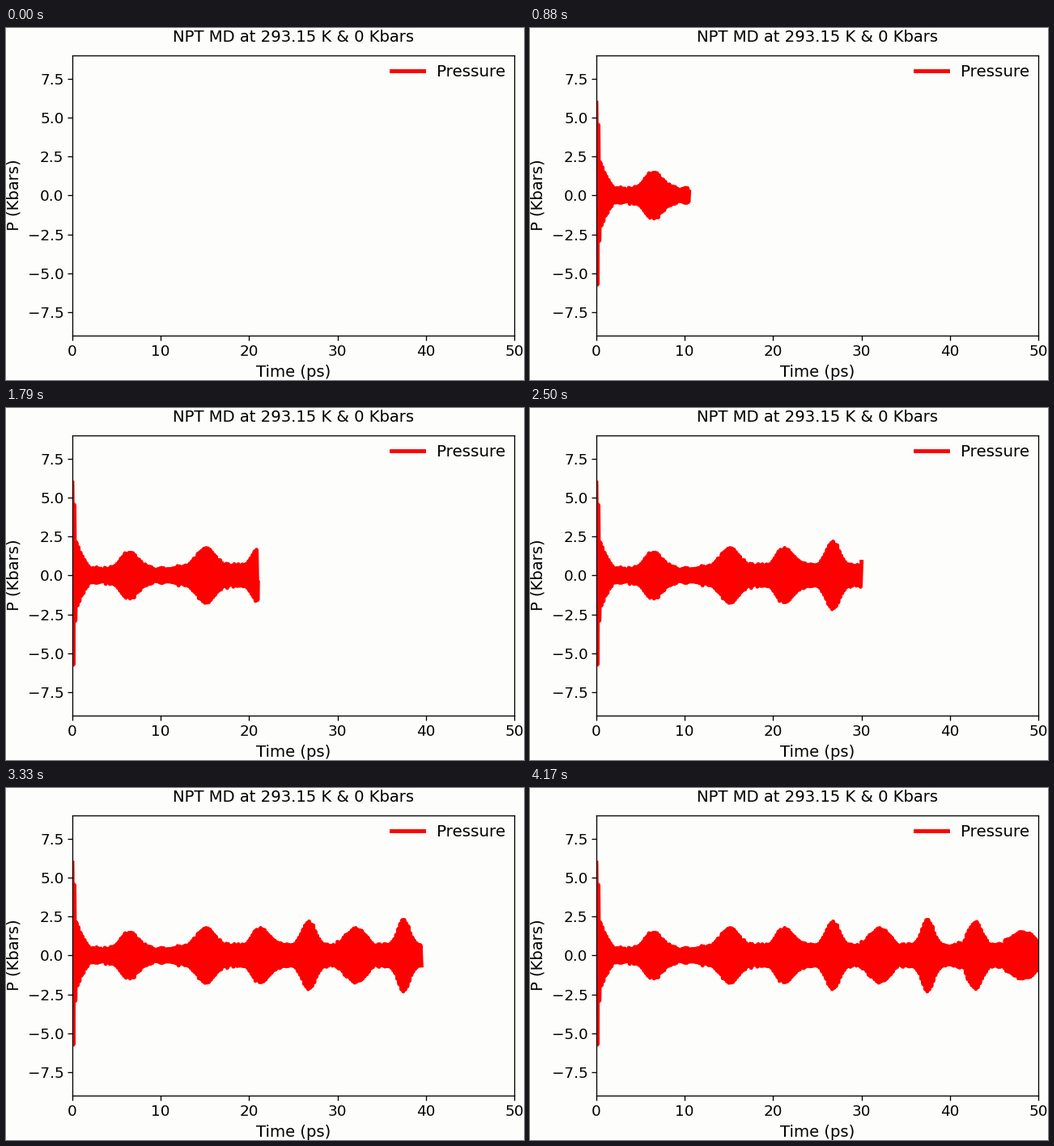
A matplotlib script for the animation above (4.21 s loop, 640 by 436 pixels).

```python
import numpy as np
import matplotlib.pyplot as plt
from matplotlib.animation import FuncAnimation

W, H, DPI = 640, 436, 100
FRAMES, LOOP_MS = 101, 4210
T_END, PERIOD, STEP = 50, 0.229, 50  # ps, ps, samples per frame
BG = "#fdfdfb"


def envelope(t):
    """Fast initial decay, a slow rise, then regular beats with rough edges."""
    amp = 4 * np.exp(-(t / 0.3) ** 3) + 1.6 * np.exp(-(t / 1.4) ** 2.5)
    amp += 0.4 + 0.22 / (1 + np.exp(12 - t))

    # The beats settle to an even spacing after the third
    heights = [1.1, 1.1, 1.1, 1.55, 1.05, 1.65, 1.5, 0.9]
    centres = np.interp(range(len(heights)), [0, 1, 2, 7], [6.5, 15.1, 21.4, 48.2])
    for c, h in zip(centres, heights):
        width = 1.1 / h  # taller beats are narrower
        amp += h * np.exp(-((t - c) / width) ** 2 / 2)

    knots = np.arange(0, T_END + 0.25, 0.25)
    rough = np.random.default_rng(4).normal(0, 0.07, knots.size)
    return amp + np.interp(t, knots, rough)


def px(x, y):
    return x / W, 1 - y / H


plt.rcParams.update({"font.family": "DejaVu Sans", "font.size": 14.1})
fig = plt.figure(figsize=(W / DPI, H / DPI), dpi=DPI, facecolor=BG)
left, bottom = px(82, 381)
right, top = px(628, 33.6)
ax = fig.add_axes([left, bottom, right - left, top - bottom], facecolor=BG)
ax.set(xlim=(0, T_END), ylim=(-9, 9), xticks=range(0, 51, 10),
       yticks=np.arange(-7.5, 8, 2.5))
ax.tick_params(length=4, width=0.95, pad=3.6, labelsize=13.2)
for spine in ax.spines.values():
    spine.set_linewidth(0.95)

fig.text(*px(355, 17), "NPT MD at 293.15 K & 0 Kbars", ha="center")
fig.text(*px(355, 432), "Time (ps)", ha="center")
fig.text(*px(16, 207), "P (Kbars)", ha="center", rotation=90,
         rotation_mode="anchor")

time = np.linspace(0, T_END, (FRAMES - 1) * STEP + 1)
signal = envelope(time) * np.cos(2 * np.pi * time / PERIOD)
line, = ax.plot([], [], color="red", lw=3.5, label="Pressure")
ax.legend(loc="upper right", frameon=False, fontsize=14.3,
          borderpad=0, borderaxespad=0.57)


def update(i):
    n = i * STEP + 1
    line.set_data(time[:n], signal[:n])
    # A lone first sample leaves no stroke
    line.set_visible(i > 0)
    return line,


anim = FuncAnimation(fig, update, frames=FRAMES, interval=LOOP_MS / FRAMES,
                     repeat=True, repeat_delay=0)
plt.show()
```
